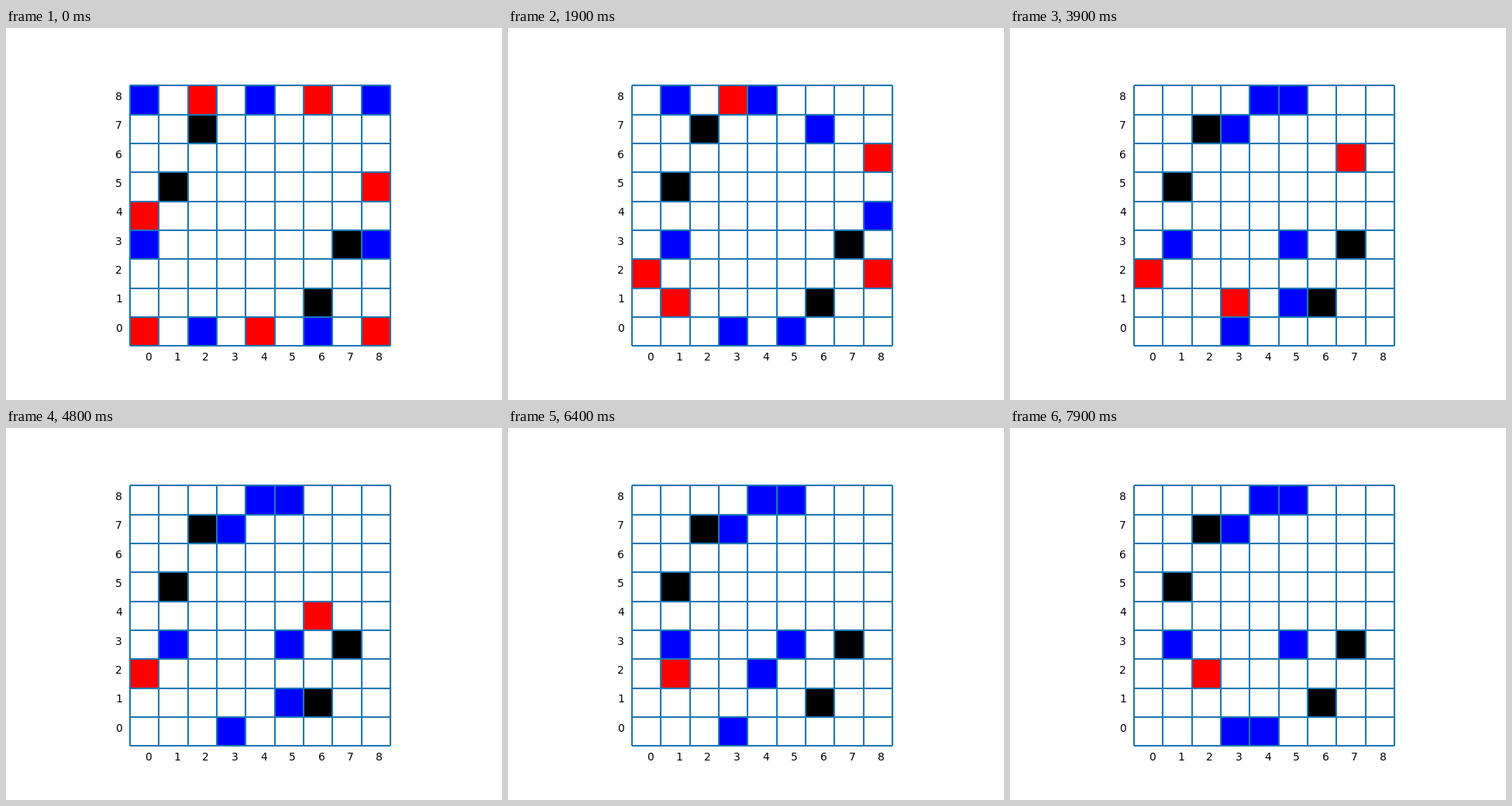
Recreate the animation shown at these times as a matplotlib script. Size 640 px wide and 480 px high, loop 8 s.

```python
from itertools import cycle, islice, pairwise

import matplotlib.pyplot as plt
from matplotlib.animation import FuncAnimation
from matplotlib.patches import Rectangle

SIZE = 9
STEPS = 80

# Each route is a start cell and its goals, as column-row pairs.
BLUE_ROUTES = [
    "20 30", "60 50", "83 84", "03 12", "08 18", "88 67", "12 13",
    "18 28", "67 58", "28 37", "84 53", "50 51 41", "53 43 53",
    "41 51 52" + " 62 52" * 2 + " 41 42",
    "53 43 53", "42 40", "53 43 53", "40 41 40",
]
RED_ROUTES = [
    "68 58", "80 82", "04 02", "85 86", "28 38", "00 11 31", "82 52",
    "86 76", "52" + " 42 52" * 2, "31 32 42", "76 74 64", "64 63",
    "02 12" + " 22 12" * 7,
]


def walk(start, goal):
    """Yield one-cell moves, first along the row, then along the column."""
    x, y = start
    while (x, y) != goal:
        old = x, y
        if x != goal[0]:
            x += 1 if goal[0] > x else -1
        else:
            y += 1 if goal[1] > y else -1
        yield old, (x, y)


def moves(routes):
    for route in routes:
        cells = [(int(c[0]), int(c[1])) for c in route.split()]
        for start, goal in pairwise(cells):
            yield from walk(start, goal)


def opening():
    board = {(0, 3): "blue", (8, 3): "blue", (0, 4): "red", (8, 5): "red"}
    for x in range(0, SIZE, 2):
        top, bottom = ("red", "blue") if x % 4 else ("blue", "red")
        board[x, 8], board[x, 0] = top, bottom
    for s in (1, -1):
        board[4 - 2 * s, 4 + 3 * s] = "black"
        board[4 - 3 * s, 4 + s] = "black"
    return board


def captured(board, cell):
    """A piece is taken between two opposite blue or black neighbours."""
    x, y = cell
    hostile = ("blue", "black")
    return any(board.get((x + dx, y + dy)) in hostile
               and board.get((x - dx, y - dy)) in hostile
               for dx, dy in ((1, 0), (0, 1)))


def play():
    board = opening()
    yield board
    sides = cycle([moves(BLUE_ROUTES), moves(RED_ROUTES)])
    for side in islice(sides, STEPS - 1):
        old, new = next(side)
        board = dict(board)
        board[new] = board.pop(old)
        board = {cell: kind for cell, kind in board.items()
                 if kind != "red" or not captured(board, cell)}
        yield board


boards = list(play())

plt.rcParams["font.family"] = "DejaVu Sans"
fig, ax = plt.subplots(figsize=(6.4, 4.8), dpi=100)
margin = 0.05 * SIZE
ax.set_xlim(-margin, SIZE + margin)
ax.set_ylim(-margin, SIZE + margin)
ax.set_aspect("equal")
ax.axis("off")

for i in range(SIZE + 1):
    for xy in (([0, SIZE], [i, i]), ([i, i], [0, SIZE])):
        ax.plot(*xy, color="C0", lw=1.5, solid_capstyle="butt")
for i in range(SIZE):
    ax.text(i + 0.5, -0.5, str(i), fontsize=10)
    ax.text(-0.5, i + 0.5, str(i), fontsize=10)

squares = {}
for col in range(SIZE):
    for row in range(SIZE):
        square = Rectangle((col, row), 1, 1, lw=0, zorder=1)
        squares[col, row] = ax.add_patch(square)


def update(n):
    for cell, square in squares.items():
        square.set_facecolor(boards[n].get(cell, "white"))
    return list(squares.values())


anim = FuncAnimation(fig, update, frames=STEPS, interval=100,
                     repeat=True, repeat_delay=0)
plt.show()
```
